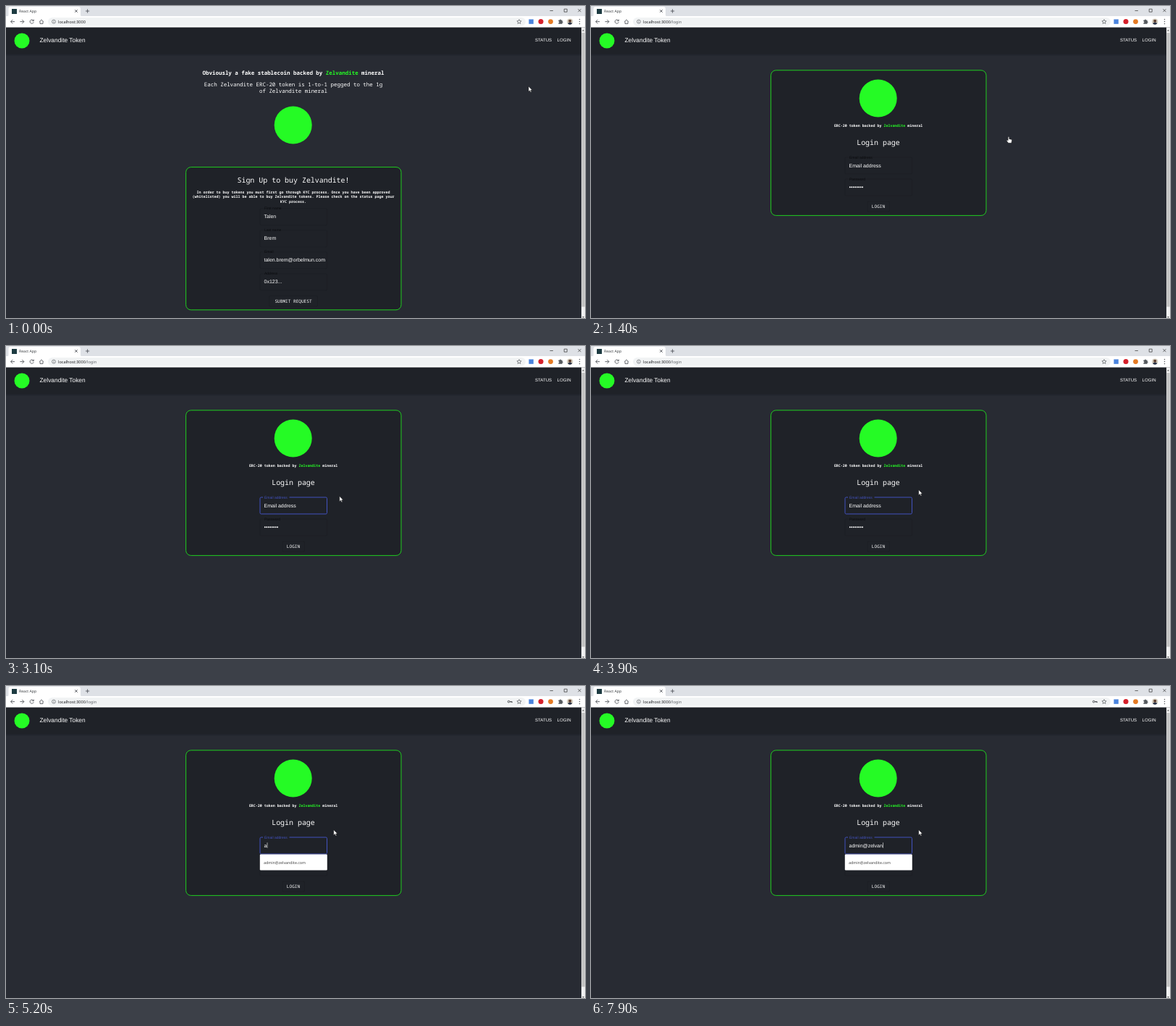
An HTML page for the animation above (8000 ms loop, 800 by 431 pixels).

```html
<!DOCTYPE html>
<html lang="en">
<head>
<meta charset="utf-8">
<title>Token login</title>
<style>
  html, body { margin: 0; width: 100%; height: 100%; overflow: hidden; background: #282b33; }
  svg { display: block; width: 100%; height: 100%; }
  text { text-rendering: geometricPrecision; white-space: pre; }
  .sans { font-family: "Liberation Sans", Arial, sans-serif; fill: #fff; }
  .ui { font-family: "Noto Sans", "Open Sans", sans-serif; }
  .mono { font-family: "Noto Sans Mono", "DejaVu Sans Mono", monospace; fill: #fff; text-anchor: middle; }
  .bold { font-weight: 700; }
  .green { fill: #25fb25; }
  .line { fill: none; stroke: #55595e; stroke-width: .9; }
</style>
</head>
<body>
<svg id="stage" viewBox="0 0 800 431" xmlns="http://www.w3.org/2000/svg"></svg>
<script>
const LOOP = 8000, STEP = 100;
const LOGIN_AT = 1400, FOCUS_AT = 2300, SELECT_AT = 4100, TYPE_AT = 5050, KEY_MS = 250;
const COIN = 'Zelvandite', TYPED = 'admin@zelvandite.com';
const coin = `<tspan class="green">${COIN}</tspan>`;

const text = (cls, x, y, size, str, extra = '') =>
  `<text class="${cls}" x="${x}" y="${y}" font-size="${size}" ${extra}>${str}</text>`;
const mono = (y, size, str, bold) => text('mono' + (bold ? ' bold' : ''), 397, y, size, str);
const rect = (x, y, w, h, fill, extra = '') =>
  `<rect x="${x}" y="${y}" width="${w}" height="${h}" fill="${fill}" ${extra}/>`;
const circle = (x, y, r, fill, extra = '') => `<circle cx="${x}" cy="${y}" r="${r}" fill="${fill}" ${extra}/>`;
const path = (d, extra = 'class="line"') => `<path d="${d}" ${extra}/>`;
const group = (id, body) => `<g id="${id}">${body}</g>`;

const card = (y, h) => rect(248.6, y, 297.4, h, '#1f2228', 'rx="7" stroke="#20d420" stroke-width=".95"');
const faintBox = (x, y, w, h) =>
  rect(x, y, w, h, 'none', 'rx="1.6" stroke="#000" stroke-opacity=".16" stroke-width=".6"');
const label = (y, str, fill = '#0b0c0f') => text('ui', 357, y, 5, str, `style="font-family:'Liberation Sans',sans-serif;fill:${fill}"`);
const field = (y, name, value) =>
  faintBox(351, y - 13.5, 92.5, 23) + label(y - 12, name) + text('sans', 356.5, y, 7, value);

function browser() {
  const dots = [18.6, 21.6, 24.6].map(y => circle(792.5, y, .75, '#55595e')).join('');
  return rect(0, 0, 800, 14.5, '#dee1e6') + rect(0, 14, 800, 15.5, '#fff') +
    path('M1 14.5Q3.5 14.5 3.5 12V4Q3.5 1 6.5 1H100Q103 1 103 4V12Q103 14.5 105.5 14.5Z', 'fill="#fff"') +
    rect(8, 4, 7, 7, '#1d3b42') +
    text('ui', 18, 9.1, 5.1, 'React App', 'fill="#3c4043"') +
    path('M95.2 5.2l3.6 3.6m0-3.6l-3.6 3.6M110 7h5.2m-2.6-2.6v5.2') +
    path('M751.5 6.5h4.4M771.2 4.2h4v4h-4zM790.4 4.2l4 4m0-4l-4 4', 'fill="none" stroke="#333" stroke-width=".7"') +
    path('M12 21.6H6.6m2.6-2.7l-2.7 2.7 2.7 2.7') +
    path('M19.4 21.6h5.4m-2.6-2.7l2.7 2.7-2.7 2.7', 'fill="none" stroke="#55595e" stroke-width=".9"') +
    path('M37.9 20.2A2.6 2.6 0 1 0 38.2 22.3M38.3 18.6v2h-2') +
    path('M46.2 21.6L49 18.9l2.8 2.7M47 21.2v3.2h4v-3.2') +
    rect(58, 16, 660, 11.4, '#f1f3f4', 'rx="5.7"') +
    circle(66, 21.6, 2.5, 'none', 'stroke="#5f6368" stroke-width=".7"') +
    path('M66 21.2v1.8M66 19.9v.6', 'stroke="#5f6368" stroke-width=".7"') +
    `<text class="ui" x="72" y="23.7" font-size="5.6" fill="#202124">localhost:3000<tspan id="route" fill="#5f6368">/login</tspan></text>` +
    path('M709 18.6l.9 2 2.2.2-1.7 1.4.5 2.2-1.9-1.2-1.9 1.2.5-2.2-1.7-1.4 2.2-.2z',
      'fill="none" stroke="#55595e" stroke-width=".7"') +
    group('key', circle(694.6, 21.6, 1.3, 'none', 'stroke="#4a4d51" stroke-width="1"') +
      path('M696 21.6h3.2v1.5m-1.4-1.5v1.2', 'fill="none" stroke="#4a4d51" stroke-width="1"')) +
    rect(722.4, 18.4, 6.4, 6.4, '#4a83dd') + circle(739, 21.6, 3.5, '#d5202b') + circle(752.5, 21.6, 3.4, '#e57b25') +
    path('M763.4 19.6h1.6a1 1 0 0 1 2 0h1.6v1.6a1 1 0 0 1 0 2v1.6h-5.2v-1.5a1 1 0 0 0 0-2z', 'fill="#55595e"') +
    circle(779.2, 21.6, 4.1, '#d5cdbd') +
    path('M776 24.1q3.2-3 6.4 0a4.1 4.1 0 0 1-6.4 0z', 'fill="#283247"') + circle(779.2, 20.7, 2, '#5d3f31') + dots;
}

function header() {
  return rect(0, 66, 795, 1.2, '#20232a') + rect(0, 67.2, 795, 1.6, '#24272f') +
    rect(0, 29.5, 795, 36.8, '#1f2228') + circle(22, 48, 10.5, '#25fb25') +
    text('sans', 46.5, 50.2, 8.4, COIN + ' Token') +
    rect(757.5, 40, 27.5, 14.6, '#fff', 'id="hover" rx="1.6" fill-opacity=".04"') +
    text('sans', 731, 49.4, 6.08, 'STATUS') + text('sans', 761.6, 49.4, 6.1, 'LOGIN');
}

function scrollbar() {
  return rect(795, 29.5, 5, 401.5, '#f1f1f1') + rect(795.4, 37, 4.2, 378.5, '#c1c1c1') +
    path('M796 34.4l1.5-1.7 1.5 1.7zM796 429l1.5 1.7 1.5-1.7z', 'fill="#555"');
}

function signup() {
  return mono(94.7, 7.47, `Obviously a fake stablecoin backed by ${coin} mineral`, true) +
    mono(110.9, 7.47, `Each ${COIN} ERC-20 token is 1-to-1 pegged to the 1g`) +
    mono(120.4, 7.47, `of ${COIN} mineral`) + circle(396.7, 164.5, 26, '#25fb25') +
    card(222.6, 197.2) + mono(244, 9.95, `Sign Up to buy ${COIN}!`) +
    mono(259, 5.01, 'In order to buy tokens you must first go through KYC process. Once you have been approved', true) +
    mono(265.3, 5, `(whitelisted) you will be able to buy ${COIN} tokens. Please check on the status page your`, true) +
    mono(271.5, 5, 'KYC process.', true) +
    field(293.3, 'First name', 'Talen') + field(323.3, 'Last name', 'Brem') +
    field(353.3, 'Email', 'talen.brem@orbelmun.com') + field(383.3, 'Address', '0x123...') +
    faintBox(363.5, 400.5, 67, 14.5) + mono(410, 6.08, 'SUBMIT REQUEST');
}

function login() {
  return card(88.8, 200.6) + circle(396.7, 127.5, 26, '#25fb25') +
    mono(166.7, 4.98, `ERC-20 token backed by ${coin} mineral`, true) + mono(191.8, 9.95, 'Login page') +
    field(222.5, 'Email address', '') + field(252.5, 'Password', '') +
    Array.from({ length: 8 }, (_, i) => circle(357.8 + i * 2.47, 250.3, .95, '#fff')).join('') +
    group('focus', rect(351, 209, 92.5, 23, 'none', 'rx="1.6" stroke="#4353c0" stroke-width="1"') +
      rect(355, 207, 36.5, 4, '#1f2228') + label(210.5, 'Email address', '#4353c0')) +
    rect(356.3, 216.3, 43.7, 7.6, '#2f7fd8', 'id="mark"') +
    text('sans', 356.5, 222.5, 7, '', 'id="email"') + rect(0, 216.3, .6, 7.4, '#fff', 'id="caret"') +
    group('hint', rect(350.8, 232.6, 93, 21.8, '#fff', 'rx="1.2"') + text('ui', 356, 245.5, 5.3, TYPED, 'fill="#444"')) +
    faintBox(382, 270, 30.5, 14) + mono(279.3, 6.1, 'LOGIN');
}

const ink = 'fill="#fff" stroke="#111" stroke-width=".45" stroke-linejoin="round"';
const cursors =
  group('arrow', path('M0 0V7.2L1.7 5.7 2.8 8.2 4 7.7 2.9 5.3H5.1Z', ink)) +
  group('hand', path('M-.8 .4Q0-.5.8.4V3.2L3.6 3.8Q4.7 4.1 4.6 5.2L3.9 8.8H-.4L-2.8 5.6Q-3 4.4-1.8 4.7L-.8 5.5Z', ink)) +
  group('beam', path('M-1.3-3.6H1.3M0-3.6V3.6M-1.3 3.6H1.3', 'fill="none" stroke="#ddd" stroke-width=".6"'));

const stage = document.getElementById('stage');
stage.innerHTML = rect(0, 0, 800, 431, '#282b33') + header() + group('signup', signup()) + group('login', login()) +
  scrollbar() + browser() + group('cursor', cursors);

const el = {};
stage.querySelectorAll('[id]').forEach(n => el[n.id] = n);
const show = (id, on) => el[id].style.display = on ? '' : 'none';

// time, x, y of the pointer tip
const track = [
  [0, 722, 111], [200, 722, 107.5], [400, 722, 107.5], [900, 766.7, 48.5], [1200, 766.7, 48.5],
  [1400, 577, 180.5], [2100, 412, 221], [2500, 412, 221], [3000, 460.8, 207.5],
  [3200, 460.8, 207.5], [3800, 452.8, 198.7]
];

function pointer(t) {
  const i = track.findIndex(k => k[0] > t);
  if (i < 0) return track[track.length - 1].slice(1);
  const [t0, x0, y0] = track[i - 1], [t1, x1, y1] = track[i];
  const u = (t - t0) / (t1 - t0), e = u * u * (3 - 2 * u);
  return [x0 + (x1 - x0) * e, y0 + (y1 - y0) * e];
}

function render(t) {
  const onLogin = t >= LOGIN_AT;
  const keys = t < TYPE_AT ? 0 : Math.floor((t - TYPE_AT) / KEY_MS) + 1;
  const [x, y] = pointer(t);
  const overLink = !onLogin && x > 757 && y < 55;
  const overField = onLogin && x > 351 && x < 444 && y > 209 && y < 232;
  const hand = overLink || (t > 1200 && t <= LOGIN_AT);

  show('signup', !onLogin);
  show('login', onLogin);
  show('route', onLogin);
  show('hover', overLink);
  show('focus', t >= FOCUS_AT);
  show('mark', t >= SELECT_AT && !keys);
  show('key', keys);
  show('hint', keys);
  show('caret', keys);
  el.email.textContent = keys ? TYPED.slice(0, keys) : 'Email address';
  if (keys) el.caret.setAttribute('x', 356.8 + el.email.getComputedTextLength());

  el.cursor.setAttribute('transform', `translate(${x} ${y})`);
  show('hand', hand);
  show('beam', !hand && overField);
  show('arrow', !hand && !overField);
}

const start = performance.now();
function tick() {
  const t = (performance.now() - start) % LOOP;
  render(Math.floor(t / STEP) * STEP);
  requestAnimationFrame(tick);
}
tick();
</script>
</body>
</html>
```
